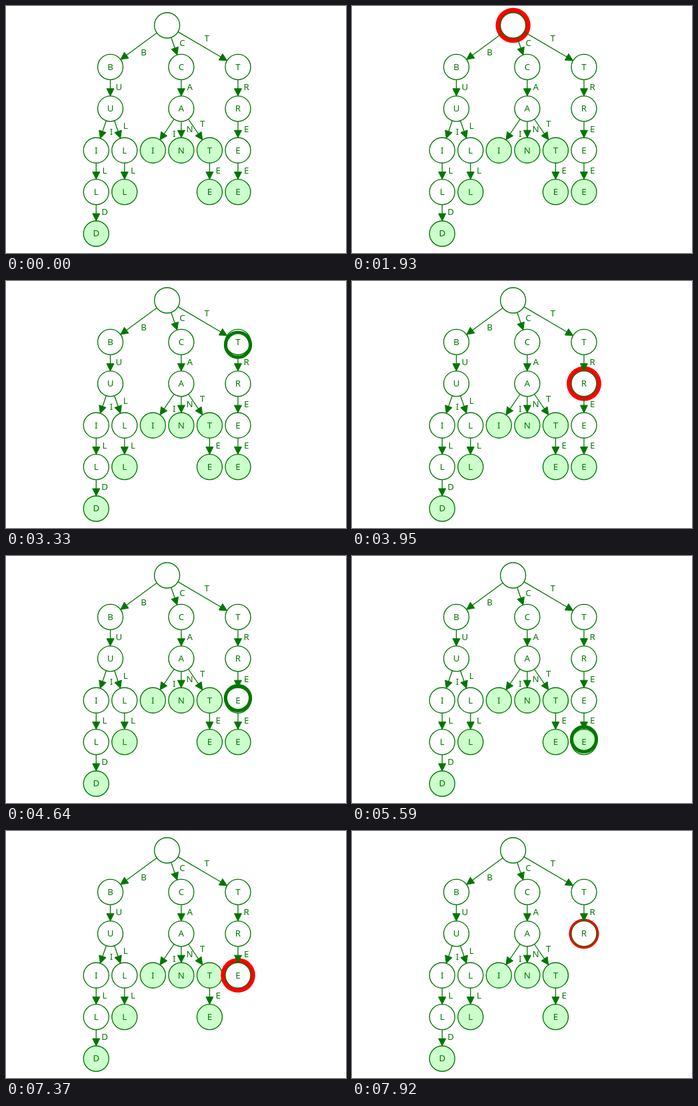
Write an HTML page that moves like this. It is 510x370 px and loops after 8000 ms.

```html
<!DOCTYPE html>
<html lang="en">
<head>
<meta charset="utf-8">
<title>Trie deletion</title>
<style>
  html, body { margin: 0; width: 100%; height: 100%; overflow: hidden; background: #fff; }
  svg { display: block; width: 510px; height: 370px; }
  text { font: 13.3px "Noto Sans", "Open Sans", sans-serif; text-anchor: middle; fill: #070; }
  .node { stroke: #070; stroke-width: 1.35; }
  .halo { fill: #f00; }
  .cursor { fill: none; stroke: #070; stroke-width: 5.2; }
  .edge line { stroke: #070; stroke-width: 1.3; }
  .edge path { fill: #070; stroke: #070; }
</style>
</head>
<body>
<svg viewBox="0 0 510 370">
  <g id="nodes"></g>
  <circle id="cursor" class="cursor" r="18.6"/>
  <g id="edges"></g>
</svg>
<script>
const LOOP = 8000;
const RADIUS = 19;
const WORD = '#cfc';
const PLAIN = '#fff';

// id: [parent, column, ends a word]; the last letter of the id is the label
const TRIE = {
  '': [null, 0], B: ['', -4], BU: ['B', -4],
  BUI: ['BU', -5], BUIL: ['BUI', -5], BUILD: ['BUIL', -5, true],
  BUL: ['BU', -3], BULL: ['BUL', -3, true],
  C: ['', 1], CA: ['C', 1], CAI: ['CA', -1, true], CAN: ['CA', 1, true],
  CAT: ['CA', 3, true], CATE: ['CAT', 3, true],
  T: ['', 5], TR: ['T', 5], TRE: ['TR', 5], TREE: ['TRE', 5, true]
};

// [start, end, node]
const HIGHLIGHTS = [
  [1930, 2365, ''], [2812, 3300, 'T'], [3760, 4208, 'TR'], [4665, 5180, 'TRE'],
  [5620, 7050, 'TREE'], [7050, 7520, 'TRE'], [7520, LOOP, 'TR']
];
// [start, end, from, to]
const MOVES = [
  [2365, 2812, '', 'T'], [3300, 3760, 'T', 'TR'],
  [4208, 4665, 'TR', 'TRE'], [5180, 5620, 'TRE', 'TREE']
];
const UNMARK_AT = 6110;
const REMOVED_AT = { TREE: 7050, TRE: 7520 };

const PULSE = { period: 1700, peak: 2070, min: 3, max: 8 };

const nodeLayer = document.getElementById('nodes');
const edgeLayer = document.getElementById('edges');
const cursor = document.getElementById('cursor');
const nodes = {};

function add(parent, tag, attrs = {}, content = '') {
  const el = document.createElementNS('http://www.w3.org/2000/svg', tag);
  setAttrs(el, attrs);
  el.textContent = content;
  return parent.appendChild(el);
}

function setAttrs(el, attrs) {
  for (const key in attrs) el.setAttribute(key, attrs[key]);
}

function show(el, visible) {
  el.setAttribute('visibility', visible ? 'visible' : 'hidden');
}

function addLabel(parent, x, y, letter) {
  add(parent, 'text', { x, y: y + 4.3 }, letter);
}

function addNode(id, column, isWord) {
  const x = 241.6 + 21.27 * column;
  const y = 29 + 62.4 * id.length;
  const group = add(nodeLayer, 'g');
  const halo = add(group, 'circle', { class: 'halo', cx: x, cy: y });
  const disc = add(group, 'circle',
    { class: 'node', cx: x, cy: y, r: RADIUS, fill: isWord ? WORD : PLAIN });
  addLabel(group, x, y, id.slice(-1));
  return { x, y, group, halo, disc };
}

function addEdge(from, to, letter) {
  const length = Math.hypot(to.x - from.x, to.y - from.y);
  const dx = (to.x - from.x) / length;
  const dy = (to.y - from.y) / length;
  const group = add(edgeLayer, 'g', { class: 'edge' });
  const tip = { x: to.x - RADIUS * dx, y: to.y - RADIUS * dy };
  add(group, 'line', {
    x1: from.x + RADIUS * dx, y1: from.y + RADIUS * dy,
    x2: tip.x - 2 * dx, y2: tip.y - 2 * dy
  });
  const corner = side =>
    `${tip.x - 11 * dx - side * dy},${tip.y - 11 * dy + side * dx}`;
  add(group, 'path', { d: `M${tip.x},${tip.y}L${corner(5.5)}L${corner(-5.5)}Z` });
  addLabel(group, (from.x + to.x) / 2 + 12.8 * dy, (from.y + to.y) / 2 - 12.8 * dx - 0.8, letter);
  return group;
}

for (const [id, [parent, column, isWord]] of Object.entries(TRIE)) {
  const node = nodes[id] = addNode(id, column, isWord);
  if (parent !== null) node.edge = addEdge(nodes[parent], node, id.slice(-1));
}

const activeAt = (steps, t) => steps.find(([start, end]) => t >= start && t < end);

// Triangle wave between the smallest and largest halo width
function haloWidth(t) {
  const phase = (t - PULSE.peak) / PULSE.period;
  const distance = 2 * Math.abs(phase - Math.round(phase));
  return PULSE.max - (PULSE.max - PULSE.min) * distance;
}

function render(t) {
  const highlight = activeAt(HIGHLIGHTS, t);
  for (const id in nodes) {
    const node = nodes[id];
    const present = !(t >= REMOVED_AT[id]);
    show(node.group, present);
    if (node.edge) show(node.edge, present);
    node.halo.setAttribute('r', 0);
  }
  nodes.TREE.disc.setAttribute('fill', t < UNMARK_AT ? WORD : PLAIN);

  if (highlight) {
    const { group, halo } = nodes[highlight[2]];
    halo.setAttribute('r', RADIUS + haloWidth(t));
    if (nodeLayer.lastChild !== group) nodeLayer.append(group);
  }

  const move = activeAt(MOVES, t);
  show(cursor, move);
  if (move) {
    const [start, end, fromId, toId] = move;
    const from = nodes[fromId];
    const to = nodes[toId];
    const progress = (t - start) / (end - start);
    setAttrs(cursor, {
      cx: from.x + (to.x - from.x) * progress,
      cy: from.y + (to.y - from.y) * progress
    });
  }
}

const startTime = performance.now();
function tick() {
  render((performance.now() - startTime) % LOOP);
  requestAnimationFrame(tick);
}
tick();
</script>
</body>
</html>
```
